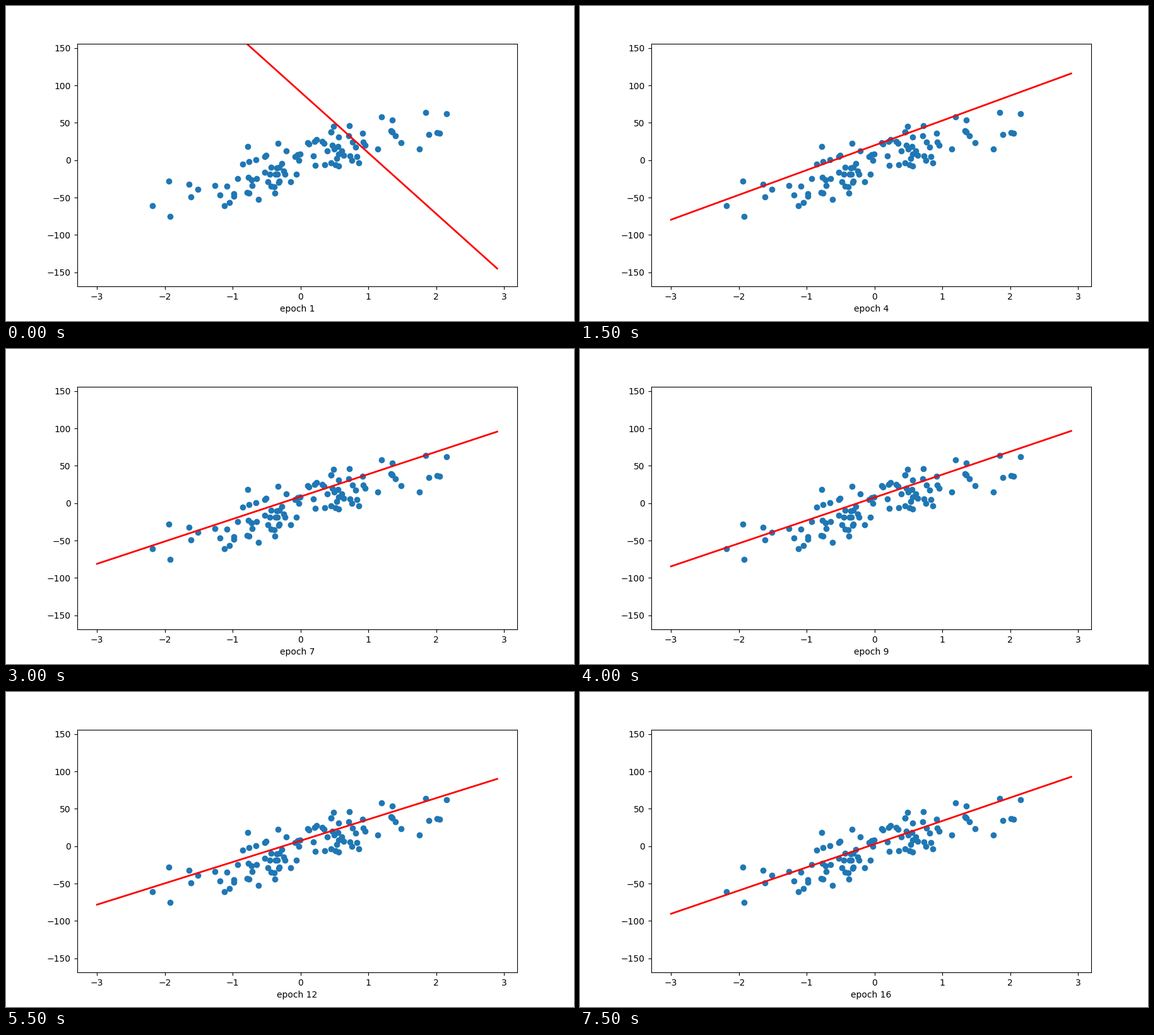
Animation, 900 px wide and 500 px high, one loop 8000 ms. Source, as a matplotlib script:

```python
import numpy as np
import matplotlib.pyplot as plt
from matplotlib.animation import FuncAnimation

W, H, DPI = 900, 500, 100
SAMPLES, SLOPE, SPREAD = 100, 27.4, 17.0
EPOCHS, STEP_MS = 16, 500
LINE_X = (-3.0, 2.9)

# Key poses of the fitted line: epoch, height at its left and right end
POSES = [(1, 336, -145.1), (2, 305.6, -107.4), (4, -79.7, 116.1),
         (6, -84, 116), (7, -81.2, 95.8), (10, -86.3, 97.2),
         (12, -78.3, 90.1), (14, -92.6, 106.6), (16, -90.5, 92.9)]


def make_samples(seed=13):
    """Linear cloud with a fixed trend and a fixed residual spread."""
    rng = np.random.RandomState(seed)
    x = rng.standard_normal(SAMPLES)
    rng.uniform()
    noise = rng.standard_normal(SAMPLES)
    noise -= x * (noise @ x) / (x @ x)
    return x, SLOPE * x + noise * SPREAD / noise.std()


def line_ends(epoch):
    keys, left, right = zip(*POSES)
    return np.interp(epoch, keys, left), np.interp(epoch, keys, right)


fig, ax = plt.subplots(figsize=(W / DPI, H / DPI), dpi=DPI)
fig.subplots_adjust(left=0.125, right=0.9, bottom=0.11, top=0.88)
ax.set_xlim(-3.295, 3.195)
ax.set_ylim(-168.95, 155.85)

ax.scatter(*make_samples())
fit, = ax.plot(LINE_X, line_ends(1), "r-", lw=2)
label = ax.set_xlabel("epoch 1")


def update(i):
    epoch = i + 1
    fit.set_ydata(line_ends(epoch))
    label.set_text(f"epoch {epoch}")
    return fit, label


anim = FuncAnimation(fig, update, frames=EPOCHS, interval=STEP_MS,
                     repeat=True, repeat_delay=0, blit=False)
plt.show()
```
